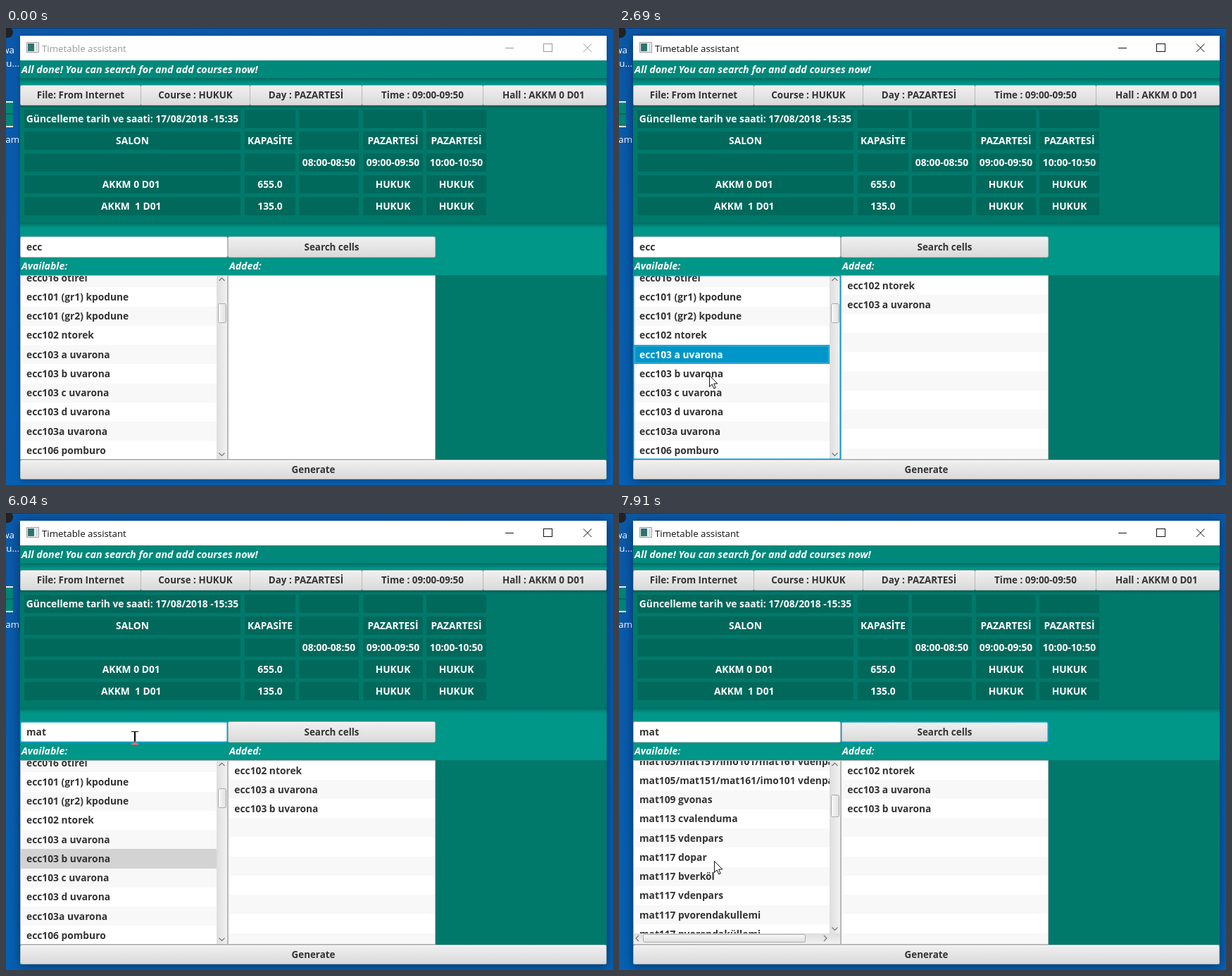
Recreate the animation shown at these times as an HTML page with a canvas. Size 862 by 649 pixels, loop 7990 ms.

```html
<!DOCTYPE html>
<html lang="en">
<head>
<meta charset="utf-8">
<title>Timetable assistant</title>
<style>
html, body { margin: 0; width: 100%; height: 100%; overflow: hidden; background: #0460b2; }
canvas { display: block; }
</style>
</head>
<body>
<canvas id="stage" width="862" height="649"></canvas>
<script>
const g = document.getElementById('stage').getContext('2d');
const LOOP = 7990, ROW = 27.25;
const TEAL = '#009688', PANEL = '#00796b', CELL = '#00695c', BLUE = '#0096c9', FOCUS = '#039ed3', INK = '#333';
const FAMILY = '"Open Sans", "Noto Sans", sans-serif';

const eccRows = ['ecc016 otirel', 'ecc101 (gr1) kpodune', 'ecc101 (gr2) kpodune', 'ecc102 ntorek',
  'ecc103 a uvarona', 'ecc103 b uvarona', 'ecc103 c uvarona', 'ecc103 d uvarona',
  'ecc103a uvarona', 'ecc106 pomburo'];
const matRows = ['mat105/mat151/imo101/mat161 vdenpars', 'mat105/mat151/mat161/imo101 vdenpars',
  'mat109 gvonas', 'mat113 cvalenduma', 'mat115 vdenpars', 'mat117 dopar', 'mat117 bverköl',
  'mat117 vdenpars', 'mat117 pvorendakullemi', 'mat117 pvorendaküllemi'];
const columns = [[26, 307], [339, 72], [416, 85], [507, 85], [597, 85]];
const table = [
  ['Güncelleme tarih ve saati: 17/08/2018 -15:35'],
  ['SALON', 'KAPASİTE', '', 'PAZARTESİ', 'PAZARTESİ'],
  ['', '', '08:00-08:50', '09:00-09:50', '10:00-10:50'],
  ['AKKM 0 D01 ', '655.0', '', 'HUKUK', 'HUKUK'],
  ['AKKM  1 D01 ', '135.0', '', 'HUKUK', 'HUKUK']];
const filters = [[20, 'File: From Internet'], [191, 'Course : HUKUK'], [346, 'Day : PAZARTESİ'],
  [505, 'Time : 09:00-09:50'], [677, 'Hall : AKKM 0 D01 '], [852]];

// start, end, steps, x, y
const moves = [[70, 300, 4, 132, 471], [520, 830, 5, 100, 433], [1440, 1760, 5, 109, 460],
  [2300, 2690, 6, 128, 493], [3100, 3390, 5, 129, 342], [3470, 3700, 4, 120, 318],
  [5960, 6500, 8, 371, 316], [6980, 7530, 8, 218, 427], [7850, 7910, 2, 135, 494]];
const clicks = [[1120, 1230], [1900, 1980], [2860, 2930], [3780, 3870], [6600, 6660]];
const typing = [[0, 'ecc'], [4560, 'ec'], [4720, 'e'], [4860, ''], [5030, 'm'], [5180, 'ma'], [5270, 'mat']];

function rect(x, y, w, h, fill) {
  g.fillStyle = fill;
  g.fillRect(x, y, w, h);
}

function box(x, y, w, h, fill, stroke, radius = 0, line = 1) {
  g.beginPath();
  g.roundRect(x + line / 2, y + line / 2, w - line, h - line, radius);
  g.fillStyle = fill;
  g.fill();
  g.strokeStyle = stroke;
  g.lineWidth = line;
  g.stroke();
}

// Control outline: grey when idle, blue with a faint halo when focused
function control(x, y, w, h, fill, focused, radius) {
  if (focused) box(x - 1, y - 1, w + 2, h + 2, 'transparent', 'rgba(3,158,211,.2)', radius);
  box(x, y, w, h, fill, focused ? FOCUS : '#b8b8b8', radius, focused ? 1.5 : 1);
}

function text(str, x, y, color = INK, align = 'left', size = 13.8, style = 'bold') {
  g.font = `${style} ${size}px ${FAMILY}`;
  g.fillStyle = color;
  g.textAlign = align;
  g.fillText(str, x, y);
}

function path(points, color, width = 1) {
  g.beginPath();
  points.forEach(([x, y]) => g.lineTo(x, y));
  g.strokeStyle = color;
  g.lineWidth = width;
  g.stroke();
}

function fade(x, y, w, h, from, to, across) {
  const grad = across ? g.createLinearGradient(x, 0, x + w, 0) : g.createLinearGradient(0, y, 0, y + h);
  grad.addColorStop(0, from);
  grad.addColorStop(1, to);
  return grad;
}

function button(x, y, w, h, label, focused, pressed) {
  const fill = pressed ? fade(x, y, w, h, '#dedede', '#cfcfcf') : fade(x, y, w, h, '#f1f1f1', '#d9d9d9');
  control(x, y, w, h, fill, focused, 2);
  if (!focused) rect(x + 2, y + 1, w - 4, 1, '#fbfbfb');
  text(label, x + w / 2, Math.floor(y + h / 2 + 5), INK, 'center', 13.4);
}

function shadow(y, height) {
  rect(20, y, 833, height, fade(0, y, 0, height, 'rgba(0,50,45,.42)', 'rgba(0,50,45,0)'));
}

function desktop(active) {
  rect(0, 0, 862, 649, fade(0, 0, 0, 649, '#0a58a8', '#0560b3'));
  rect(0, 0, 862, 1, '#083f7c');
  g.beginPath();
  g.arc(2, 6, 8, 0, 7);
  g.fillStyle = '#222';
  g.fill();
  rect(0, 104, 10, 37, '#008577');
  rect(0, 104, 10, 2, '#e8f0ee');
  rect(0, 121, 10, 2, '#00695c');
  rect(0, 139, 10, 2, '#e8f0ee');
  text('wa', 12, 36, '#fff', 'right', 13.3, 'normal');
  text("'u...", 19, 55, '#fff', 'right', 13.3, 'normal');
  text('am', 19, 163, '#fff', 'right', 13.3, 'normal');
  g.save();
  g.shadowColor = `rgba(0,0,0,${active ? .45 : .25})`;
  g.shadowBlur = active ? 14 : 8;
  g.shadowOffsetY = 2;
  rect(20, 11, 833, 630, TEAL);
  g.restore();
}

function titleBar(active) {
  const ink = active ? '#111' : '#999';
  rect(20, 11, 833, 35, '#fff');
  box(29, 20, 18, 15, '#f4f4f4', '#999');
  rect(31, 22, 9, 11, '#2d7470');
  rect(42, 22, 3, 11, '#d5dcdc');
  text('Timetable assistant', 51, 34, ink, 'left', 13.3, 'normal');
  path([[709, 28.5], [721, 28.5]], ink);
  g.strokeRect(763.5, 22.5, 12, 11);
  path([[820, 22.5], [831.5, 34]], ink);
  path([[831.5, 22.5], [820, 34]], ink);
}

function timetable() {
  rect(20, 46, 833, 25, '#00897b');
  shadow(71, 8);
  text('All done! You can search for and add courses now!', 22, 64, '#fff', 'left', 14.3, 'italic bold');
  rect(20, 110, 833, 166, PANEL);
  shadow(110, 4);
  shadow(276, 8);
  for (let i = 0; i < 5; i++) {
    const x = filters[i][0];
    button(x, 81, filters[i + 1][0] - x + 1, 29, filters[i][1]);
  }
  table.forEach((line, r) => columns.forEach(([x, w], c) => {
    rect(x, 116 + 31 * r, w, 26, CELL);
    if (line[c]) text(line[c], x + w / 2, 134 + 31 * r, '#fff', 'center');
  }));
}

function chevron(x, y, dx, dy) {
  path([[x - 4 * dy - 2 * dx, y - 4 * dx - 2 * dy], [x + 2 * dx, y + 2 * dy],
    [x + 4 * dy - 2 * dx, y + 4 * dx - 2 * dy]], '#777', 1.2);
}

function availableList(t) {
  const mat = t >= 6660, focused = t >= 1120 && t < 3780;
  const rows = mat ? matRows : eccRows, top = mat ? 339.5 : 341.6;
  const bottom = mat ? 597 : 612;
  const selected = mat || t < 1120 ? -1 : t < 1900 ? 3 : t < 2860 ? 4 : 5;
  rect(20, 351, 295, 262, '#fff');
  g.save();
  g.beginPath();
  g.rect(21, 352, 278, bottom - 352);
  g.clip();
  rows.forEach((label, i) => {
    const y = Math.floor(top + ROW * i), h = Math.floor(top + ROW * (i + 1)) - y;
    const on = i === selected;
    if (i % 2 === 0) rect(21, y, 278, h, '#f8f8f8');
    if (on) rect(21, y, 278, h, focused ? BLUE : '#d3d3d3');
    if (on && focused) {
      g.strokeStyle = '#45b5dc';
      g.lineWidth = 1;
      g.strokeRect(22.5, y + 1.5, 275, h - 3);
    }
    text(label, 29, Math.floor(top + ROW * i + 18.6), on && focused ? '#fff' : INK);
  });
  g.restore();

  rect(299, 352, 15, bottom - 352, fade(299, 0, 15, 0, '#dedede', '#f1f1f1', true));
  chevron(306.5, 357, 0, -1);
  chevron(306.5, bottom - 6.5, 0, 1);
  const thumbY = mat ? 400 : 391;
  box(301, thumbY, 12, mat ? 32 : 28, fade(301, 0, 12, 0, '#fafafa', '#dedede', true), '#a9a9a9', 2);
  if (mat) {
    rect(21, 597, 293, 15, fade(0, 597, 0, 15, '#dedede', '#f1f1f1'));
    chevron(26, 604, -1, 0);
    chevron(293, 604, 1, 0);
    box(34, 598, 231, 12, fade(0, 598, 0, 12, '#fafafa', '#dedede'), '#a9a9a9', 2);
  }
  control(20, 351, 295, 262, 'transparent', focused, 0);
}

function addedList(t) {
  const count = (t >= 1230) + (t >= 1980) + (t >= 2930);
  control(315, 351, 295, 262, '#fff', false, 0);
  for (let i = 0; count && i < 10; i++) {
    const y = Math.floor(352 + ROW * i);
    if (i % 2) rect(316, y, 293, Math.min(27, 612 - y), '#f8f8f8');
    if (i < count) text(eccRows[3 + i], 324.3, Math.floor(371 + ROW * i));
  }
}

function searchRow(t) {
  const focused = t >= 3780 && t < 6600;
  button(315, 296, 295, 30, 'Search cells', t >= 6600, t >= 6600 && t < 6660);
  control(20, 296, 295, 30, '#fff', focused, 2);
  const value = typing.filter(([at]) => t >= at).pop()[1];
  text(value, 29, 316);
  const hidden = (t >= 4400 && t < 4560) || (t >= 5730 && t < 6230);
  if (focused && !hidden) rect(Math.round(29 + g.measureText(value).width), 302, 1, 18, '#000');
  text('Available:', 22, 343, '#fff', 'left', 14, 'italic bold');
  text('Added:', 317, 343, '#fff', 'left', 14, 'italic bold');
}

function pointerAt(t) {
  let x = 467, y = 608;
  for (const [start, end, steps, toX, toY] of moves) {
    if (t < start) break;
    const step = Math.floor((t - start) / (end - start) * (steps - 1) + 1.001);
    const p = Math.min(1, step / steps);
    x += (toX - x) * p;
    y += (toY - y) * p;
  }
  return [x, y];
}

function pointer(t) {
  if (t < 70) return;
  const [x, y] = pointerAt(t);
  if (clicks.some(([from, to]) => t >= from && t < to)) {
    g.beginPath();
    g.arc(x, y, 14, 0, 7);
    g.fillStyle = 'rgba(226,214,30,.63)';
    g.fill();
  }
  g.save();
  g.translate(Math.round(x), Math.round(y));
  if (x < 315 && y > 296 && y < 326) {
    g.globalCompositeOperation = 'difference';
    rect(-1, -7, 2, 16, '#fff');
    rect(-5, -8, 10, 1, '#fff');
    rect(-5, 9, 10, 2, '#fff');
  } else {
    g.beginPath();
    [[.5, .5], [.5, 16.5], [4.2, 13], [6.8, 19], [9.2, 18], [6.7, 12], [11.8, 12]]
      .forEach(([px, py]) => g.lineTo(px, py));
    g.closePath();
    g.fillStyle = '#fff';
    g.fill();
    g.strokeStyle = '#111';
    g.lineWidth = 1;
    g.stroke();
  }
  g.restore();
}

function draw(now) {
  const t = now % LOOP, active = t >= 1120;
  desktop(active);
  titleBar(active);
  timetable();
  searchRow(t);
  rect(610, 351, 243, 262, PANEL);
  addedList(t);
  availableList(t);
  button(20, 613, 833, 28, 'Generate');
  pointer(t);
  requestAnimationFrame(draw);
}
requestAnimationFrame(draw);
</script>
</body>
</html>
```
